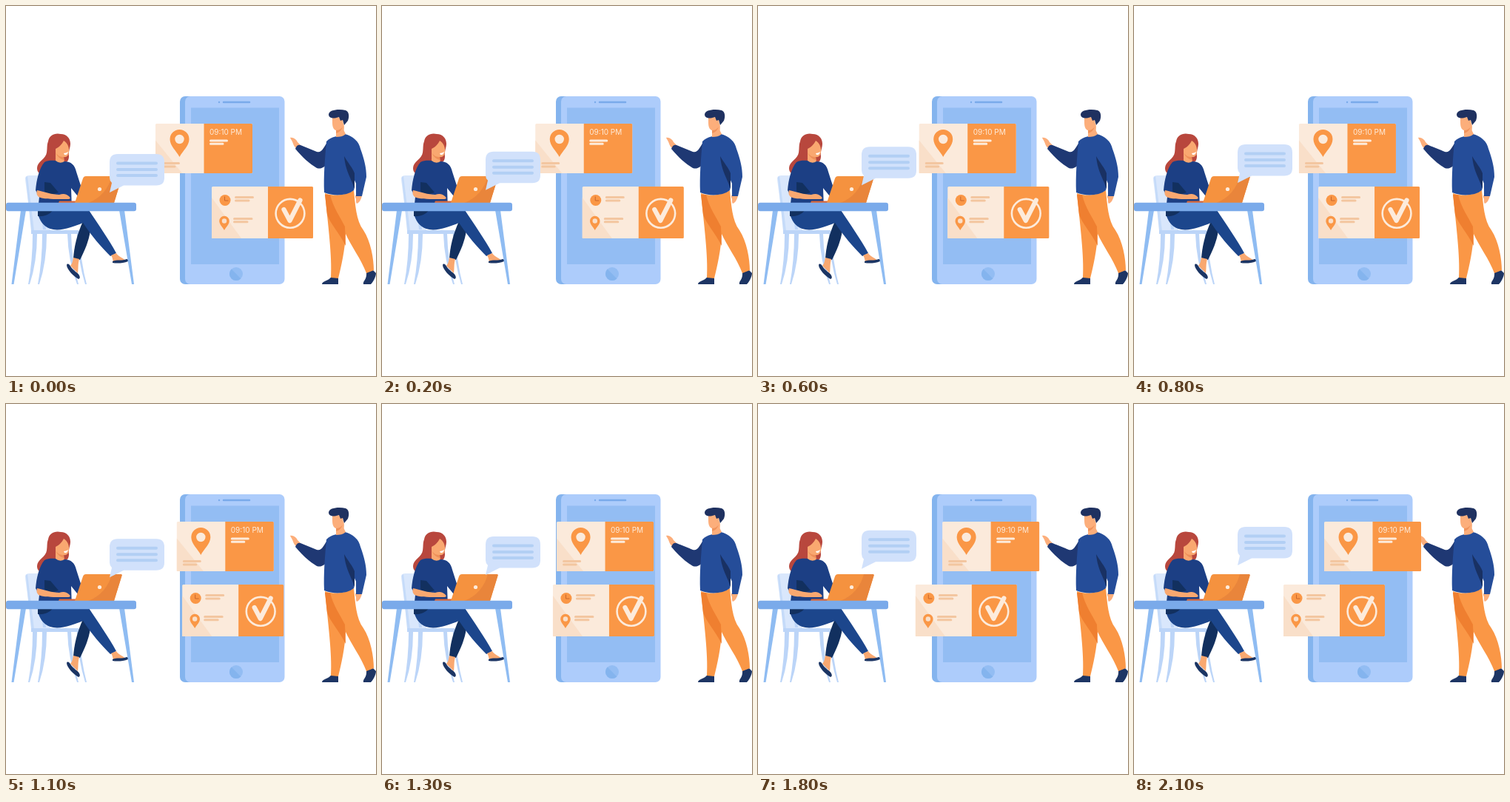
An HTML page that plays this animation: 500x500 px, repeating every 4100 ms.

```html
<!DOCTYPE html>
<html lang="en">
<head>
<meta charset="utf-8">
<title>Booking</title>
<style>
html, body { margin: 0; width: 100%; height: 100%; overflow: hidden; background: #fff; }
svg { display: block; width: 100%; height: 100%; }
.bar { fill: none; stroke-width: 3; stroke-linecap: round; }
.time { font: 400 10px Inter, "Open Sans", sans-serif; fill: #fdebdb; }
</style>
</head>
<body>
<svg viewBox="0 0 500 500">
  <defs>
    <path id="pin" fill="#fa9746" fill-rule="evenodd"
      d="M0 24 C-4 16 -13 9 -13 0 A13 13 0 0 1 13 0 C13 9 4 16 0 24Z M-6.2 0 A6.2 6.2 0 1 0 6.2 0 A6.2 6.2 0 1 0 -6.2 0Z"/>
  </defs>

  <g id="phone">
    <rect x="235" y="122" width="130" height="254" rx="7" fill="#84b4ee"/>
    <rect x="242" y="122" width="134.500" height="254" rx="7" fill="#adccfb"/>
    <rect x="250" y="137.500" width="119" height="211.500" fill="#93bdf3"/>
    <circle cx="288" cy="130" r="1.200" fill="#79aaea"/>
    <path d="M294 130H329" class="bar" stroke="#79aaea" style="stroke-width:2.500"/>
    <circle cx="311" cy="362" r="9" fill="#93bdf3"/>
    <path d="M304.600 355.600A9 9 0 1 0 317.400 368.400Z" fill="#84b4ee"/>
  </g>

  <g id="chair">
    <path d="M26 235Q25 229 31 229H47L60 303H35Z" fill="#d9e7fc"/>
    <path d="M43 229Q46 229 46 234L54 302H50Z" fill="#bcd5f8"/>
    <path d="M27 234Q26 231 29 230L38 304H34Z" fill="#c5dbf9"/>
    <path d="M34 303H97Q99 303 99 305V308H34Z" fill="#bcd5f8"/>
    <path d="M36 308H42Q42 346 32 376H30Q36 344 36 308ZM49 308H55Q55 346 45 376H43Q49 344 49 308ZM83 308H88Q89 346 98 376H96Q84 344 83 308ZM96 308H99Q101 346 109 376H107Q97 344 96 308Z" fill="#bcd5f8"/>
  </g>

  <g id="woman">
    <path d="M104 291C96 308 92 326 91 341L100 343C106 331 112 318 114 303Z" fill="#12305f"/>
    <path d="M91 340L99 342C97 349 98 354 97 361L87 351C90 348 90 344 91 340Z" fill="#f9a870"/>
    <path d="M82 350C83 347 86 349 88 353C91 358 97 360 99 364Q101 368 98 369C92 366 82 356 82 350Z" fill="#1b3564"/>
    <path d="M44 276H112C124 294 140 317 149 334L141 338C129 326 115 310 104 293C92 298 76 304 64 302C52 300 47 292 44 284Z" fill="#1c468c"/>
    <path d="M43 276H63C60 281 52 285 43 284Z" fill="#12305f"/>
    <path d="M142 337L149 334C152 339 159 341 162 344L145 346C144 342 144 340 142 337Z" fill="#f9a870"/>
    <path d="M144 345C149 342 157 345 163 342Q166 342 165 345C158 348 149 348 144 347Z" fill="#1b3564"/>
    <path d="M57 183C58 175 66 171 74 173C82 173 87 179 87 186C87 192 84 196 85 203C85 208 83 211 80 211L68 210C65 214 58 222 50 226C46 228 42 225 42 219C42 210 54 207 55 198C56 192 55 188 57 183Z" fill="#b8473d"/>
    <path d="M67 193C72 191 76 186 78 182C83 185 86 191 85 198C84 203 81 205 78 204L79 212Q73 216 67 211Z" fill="#f9a870"/>
    <path d="M67 198C70 203 74 204 78 204L78.500 208C73 207 69 203 67 198Z" fill="#ee8f58"/>
    <path d="M78 199Q81 199 84 197Q83 202 79 201Z" fill="#fff"/>
    <path d="M52 211C58 208 63 209 67 209Q73 214 79 210C88 210 93 215 95 224L103 249L97 257L88 246L89 276H43L45 258L40 249C41 235 45 219 52 211Z" fill="#1c3f84"/>
    <path d="M52 238L60 239L71 252L62 255L52 251Z" fill="#12305f"/>
    <path d="M42 249C51 251 63 255 72 255C78 253 82 254 86 258Q88 261 84 261H72C62 261 50 261 44 258Q40 254 42 249Z" fill="#f9a870"/>
  </g>

  <g id="desk">
    <path d="M72 263.500H99V266H71Z" fill="#d9673a"/>
    <path d="M108 230H155Q157 230 156.500 232L146 266H93L104 233Q105 230 108 230Z" fill="#f5923f"/>
    <path d="M143 230H155Q157 230 156.500 232L146 266H111C128 260 139 246 143 230Z" fill="#e9853b"/>
    <circle cx="126.500" cy="247.500" r="2.600" fill="#fdebdb"/>
    <path d="M20 276H27L10.500 376H7.500ZM153 276H160L173 376H170Z" fill="#8fbcf2"/>
    <rect y="265.700" x="0" width="176" height="11.500" rx="3" fill="#7aaaea"/>
  </g>

  <g id="man">
    <path d="M427 376C427 371 437 372 440 365L449 367V376Z" fill="#1d3564"/>
    <path d="M483 376C482 371 488 370 487 360L496 357L500 361C500 367 495 374 493 376Z" fill="#1d3564"/>
    <path d="M472 256H481C480 262 477 266 474 267C472 265 474 261 472 259Z" fill="#fcae7b"/>
    <path d="M431 253C445 258 460 255 470 249C472 268 473 290 483 303C493 318 497 342 497 357L487 361C480 342 466 324 459 308C458 330 453 352 449 368L439 367C441 338 435 295 431 253Z" fill="#fa9746"/>
    <path d="M431 255H438C442 272 452 286 458 298L459 324C450 306 438 294 434 282Z" fill="#ef7f30"/>
    <path d="M384 178C388 177 393 181 394 184L398 188L392 192C388 189 389 186 385 180Z" fill="#fcae7b"/>
    <path d="M391 193Q393 187 398 188L420 197C427 199 429 191 435 183L436 211C430 218 426 221 420 219C410 213 400 204 391 193Z" fill="#1f3873"/>
    <path d="M433 183C439 176 450 176 458 173C469 176 477 183 479 193C484 207 487 218 487 231L481 257H473V240L470 233V249C460 257 442 257 430 252C429 230 431 205 433 183Z" fill="#254d99"/>
    <path d="M457 203C462 212 468 218 471 226V249C469 236 459 226 457 203Z" fill="#193163"/>
    <path d="M441 149L454 151L456 159C458 163 456 167 457 169L459 173C456 176 451 177 446 177V168C442 167 441 162 441 157Z" fill="#fcae7b"/>
    <path d="M446 168Q452 168 455 163Q453 170 446 172Z" fill="#f0935c"/>
    <path d="M436 147C436 140 450 139 459 141C464 143 464 150 462 155L457 161L455 154L452 155L450 150C445 152 437 153 436 147Z" fill="#1f3160"/>
  </g>

  <g id="slot">
    <rect y="244" width="137" height="70" rx="1.500" fill="#fbeadb"/>
    <path d="M0 259L40 314H0Z" fill="#f9dfc9"/>
    <path d="M76 244H135.500Q137 244 137 245.500V312.500Q137 314 135.500 314H76Z" fill="#fa9746"/>
    <circle cx="18" cy="262.500" r="7.500" fill="#fa9746"/>
    <path d="M17.500 257.500V263H22.500" fill="none" stroke="#c9672d"/>
    <use href="#pin" transform="translate(17 290.500) scale(.52)"/>
    <path d="M32.500 258.500H55.500M32.500 263H50M30.500 287.500H54M30.500 291.800H48" class="bar" stroke="#f3c6a0"/>
    <circle cx="106" cy="280.300" r="19.400" fill="none" stroke="#fdebdb" stroke-width="2.600"/>
    <path d="M97.500 275L105.500 290L119.500 262.500" fill="none" stroke="#fdebdb" stroke-width="6.200" stroke-linecap="round" stroke-linejoin="round"/>
  </g>

  <g id="place">
    <rect y="159" width="131" height="67" rx="1.500" fill="#fbeadb"/>
    <path d="M0 181.500L36 226H0Z" fill="#f9dfc9"/>
    <path d="M65.500 159H129.500Q131 159 131 160.500V224.500Q131 226 129.500 226H65.500Z" fill="#fa9746"/>
    <use href="#pin" transform="translate(32.500 180)"/>
    <path d="M9.500 212.600H31.500M9.500 217H26" class="bar" stroke="#f3c6a0"/>
    <path d="M74.500 182H96.500M74.500 186.300H91" class="bar" stroke="#fdebdb"/>
    <text x="73" y="173.700" class="time">09:10 PM</text>
  </g>

  <g id="bubble">
    <path d="M151 166H203Q214 166 214 177V198Q214 208.500 203 208.500H159L140 218L143 205Q140 202 140 198V177Q140 166 151 166Z" fill="#d1e1fb"/>
    <path d="M151 178.500H203M151 187H203M151 195H203" class="bar" stroke="#b2cff4" style="stroke-width:4"/>
  </g>
</svg>
<script>
const LOOP = 4100, STEP = 100, STEPS = 21;
const get = id => document.getElementById(id);
const place = get("place"), slot = get("slot"), bubble = get("bubble");
const move = (el, x, y) => el.setAttribute("transform", `translate(${x} ${y})`);
const mix = (a, b, k) => a + (b - a) * k;

// Everything slides evenly in 100 ms ticks, then rests.
function draw(ms) {
  const k = Math.min(Math.floor(ms % LOOP / STEP), STEPS) / STEPS;
  move(place, mix(202, 257, k), 0);
  move(slot, mix(278, 202, k), 0);
  move(bubble, 0, mix(34, 0, k));
}

const start = performance.now();
function tick() {
  draw(performance.now() - start);
  requestAnimationFrame(tick);
}
tick();
</script>
</body>
</html>
```
